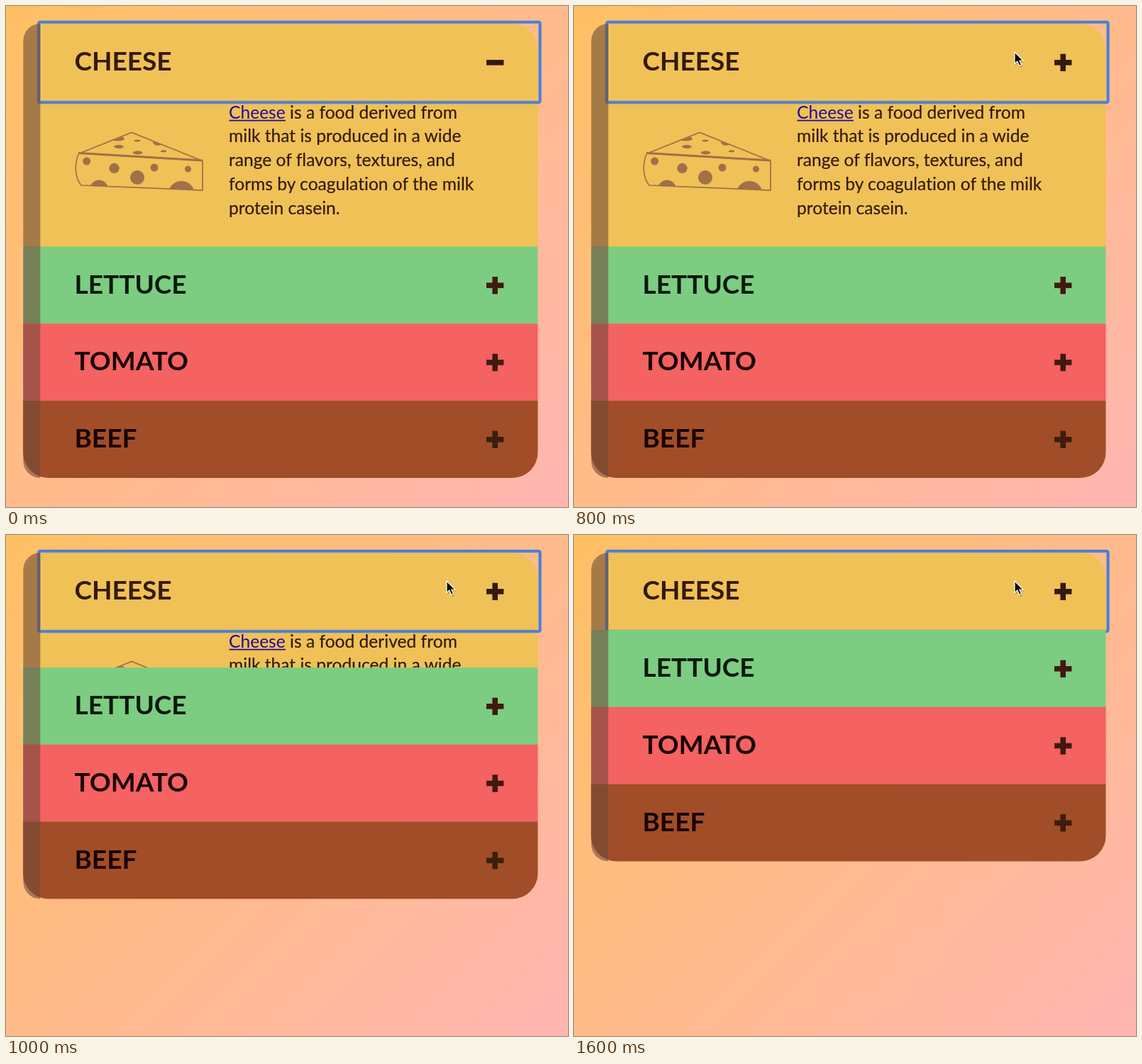
Animation, 792 px wide and 707 px high, one loop 1740 ms. Source, as an HTML page:

```html
<!DOCTYPE html>
<html lang="en">
<head>
<meta charset="utf-8">
<title>Burger accordion</title>
<style>
  html, body { margin: 0; width: 100%; height: 100%; overflow: hidden; }
  body { background: linear-gradient(135deg, #ffc063, #ffb6b2); }
  svg { display: block; font-family: Lato, "Open Sans", sans-serif; font-variant-ligatures: none; }
  .title { font-size: 37px; font-weight: 700; }
  .copy { font-size: 24.6px; fill: #331a10; stroke: #331a10; stroke-width: .2; }
  .link { fill: #230ba0; stroke: none; }
  .line { fill: none; stroke: #a07048; stroke-width: 1.7; }
  .hole { fill: #a07048; }
  .ring { fill: none; stroke: #4a7fd4; }
</style>
</head>
<body>
<svg width="792" height="707" viewBox="0 0 792 707">
  <path fill="#f0c156" d="M24 340V61a36 36 0 0 1 36-36H713.5a36 36 0 0 1 36 36V340z"/>
  <g id="cheese"></g>

  <path class="line" d="M106 207L177 178.5L273 217M102.5 208C96.500 222 96.500 242 106 253L277 260V218"/>
  <path class="line" style="stroke-width: 3.2" d="M102 207.5L277 218"/>
  <g class="hole">
    <circle cx="113.7" cy="219" r="5.5"/>
    <circle cx="152.5" cy="229" r="7.2"/>
    <circle cx="185" cy="242" r="10"/>
    <circle cx="209" cy="228" r="5.5"/>
    <circle cx="256.5" cy="230" r="4.5"/>
    <path d="M119 254C124 243 138 242 144 255zM230 258.5C237 243 258 243 265 259.5z"/>
    <path d="M150 190L163 184.5C169 186 168 190 160 190.5zM207 191L219 196C214 198 206 196 207 191z"/>
    <ellipse cx="185" cy="190" rx="4.2" ry="1.5"/>
    <ellipse cx="159" cy="198.5" rx="6.8" ry="2.5"/>
    <ellipse cx="185.5" cy="207" rx="6.8" ry="2.5"/>
    <ellipse cx="222" cy="204.8" rx="4.2" ry="1.6"/>
  </g>

  <g class="copy">
    <text x="314" y="158.5"><tspan class="link">Cheese</tspan> is a food derived from</text>
    <text x="314" y="192.3">milk that is produced in a wide</text>
    <text x="314" y="226.1">range of flavors, textures, and</text>
    <text x="314" y="259.9">forms by coagulation of the milk</text>
    <text x="314" y="293.7">protein casein.</text>
  </g>
  <path class="link" d="M314.5 160.8h79.500v1.8h-79.500z"/>

  <rect class="ring" x="46.2" y="22.8" width="706.3" height="113.2" rx="2" stroke-width="5" opacity=".4"/>
  <rect class="ring" x="46.2" y="22.8" width="706.3" height="113.2" rx="2" stroke-width="3.5"/>

  <g id="stack"></g>
  <path id="spine" fill="#70493c" fill-opacity=".59"/>

  <g id="pointer">
    <path d="M1 2.5V19L5 15.5L8 22L11 20.5L8.5 14.5H13z" fill="#000" opacity=".2"/>
    <path d="M0 0V16.5L3.8 13L6.5 19.3L9.5 18L6.8 12H12z" fill="#000" stroke="#fff" stroke-width="1.2"/>
  </g>
</svg>
<script>
const $ = id => document.getElementById(id);

const header = (label, top, ink, iconInk) => `
  <text class="title" x="96.5" y="${top + 66}" fill="${ink}">${label}</text>
  <path fill="${iconInk}" d="M677 ${top + 51}h24.4v7.6h-24.4z"/>
  <path class="upright" fill="${iconInk}" d="M685.4 ${top + 42.6}h7.6v24.4h-7.6z"/>`;

$('cheese').innerHTML = header('CHEESE', 25, '#331a0e', '#331a0e');
$('stack').innerHTML =
  '<path fill="#7ccd81" d="M24 134H749.5v109H24z"/>' +
  '<path fill="#f46261" d="M24 242.7H749.5v109H24z"/>' +
  '<path fill="#a14e28" d="M24 351.5H749.5V424.5a36 36 0 0 1-36 36H60a36 36 0 0 1-36-36z"/>' +
  header('LETTUCE', 134, '#08190b', '#411a0e') +
  header('TOMATO', 242.7, '#190304', '#3e1a0e') +
  header('BEEF', 351.5, '#190304', '#3c1e0c');

const LOOP = 1740, STEP = 1000 / 15;
const OPEN = 205.5, CLOSING = [187.5, 105.5, 53, 19];
const CLICK = 12;   // step at which the icon flips
const upright = document.querySelector('#cheese .upright');

function draw(now) {
  const step = Math.floor((now % LOOP + 4) / STEP);

  const height = step <= CLICK ? OPEN : CLOSING[step - CLICK - 1] ?? 0;
  $('stack').setAttribute('transform', `translate(0 ${height})`);
  $('spine').setAttribute('d', `M48.3 25a24 24 0 0 0-24 24V${436.5 + height}a24 24 0 0 0 24 24z`);
  upright.style.display = step < CLICK ? 'none' : '';

  const away = (1 - Math.min(step / 8, 1)) ** 2;
  $('pointer').style.display = step ? '' : 'none';
  $('pointer').setAttribute('transform', `translate(${621 + 190 * away} ${65 + 700 * away})`);

  requestAnimationFrame(draw);
}
requestAnimationFrame(draw);
</script>
</body>
</html>
```
